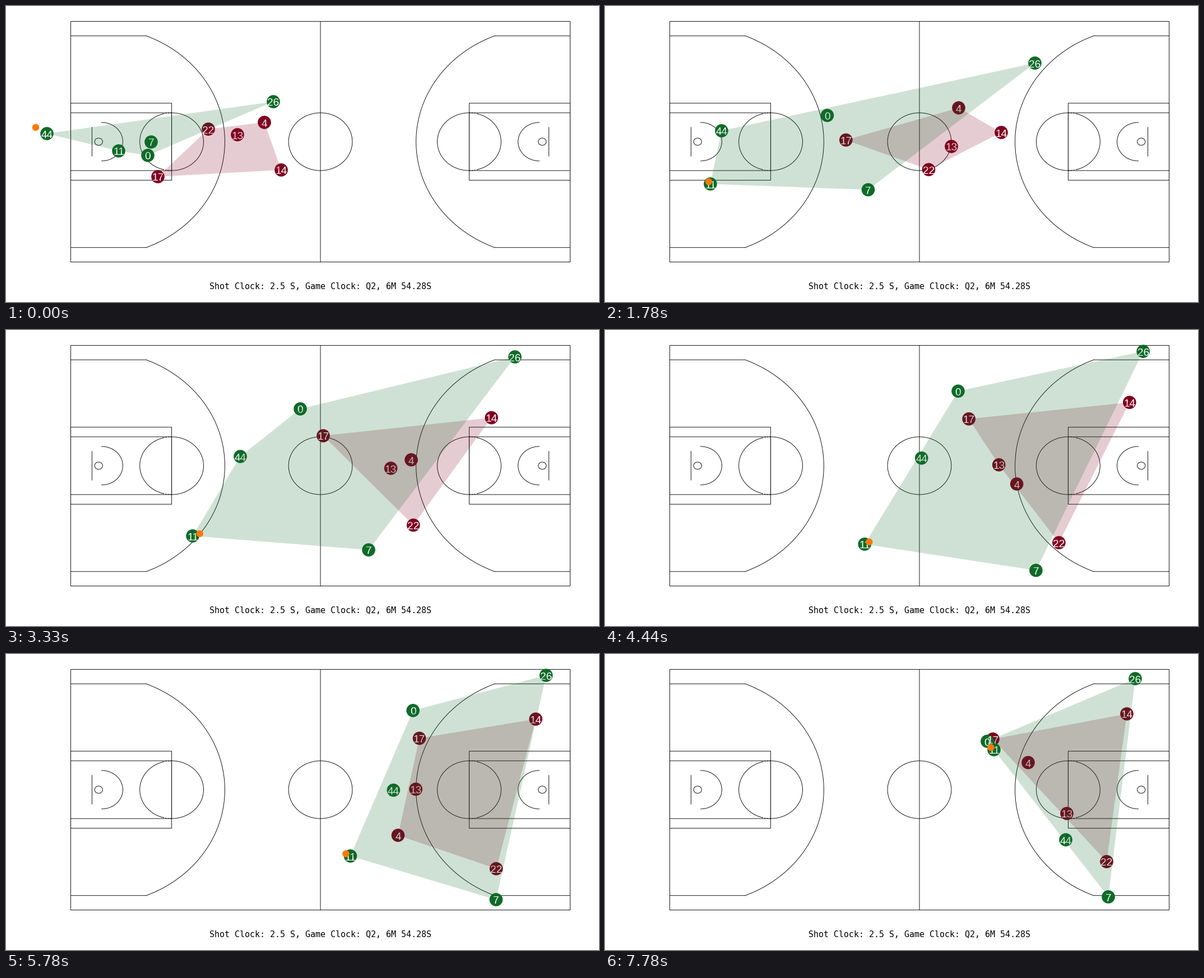
These frames come from a looping animation (1058 by 529 pixels, 8 s). A matplotlib script:

```python
import numpy as np
import matplotlib.pyplot as plt
from matplotlib.animation import FuncAnimation
from matplotlib.patches import Circle, Ellipse, Polygon, Rectangle

W, H, DPI = 1058, 529, 64
PT = 72 / DPI  # points per pixel

# The picture holds each of 36 poses; short ticks keep their starts on time.
POSES, LOOP_MS, TICK_MS, LEAD_MS = 36, 8000, 40, 32

GREEN, RED, ORANGE = "#0f6b28", "#800020", "#ff780a"
LEFT, TOP, RIGHT, BOTTOM = 115.5, 27.5, 1006.5, 457.5
FT_X, FT_Y = (RIGHT - LEFT) / 94, (BOTTOM - TOP) / 50

# Attackers: pose -> place on the stage, in pixels.
RUNS = {
    "26": {0: (477, 171), 8: (767, 102), 15: (908, 48), 22: (967, 37), 35: (946, 44)},
    "44": {0: (73, 228), 8: (208, 223), 15: (418, 226), 23: (638, 232),
           30: (751, 272), 35: (822, 332)},
    "11": {0: (201, 259), 8: (188, 318), 15: (333, 368), 23: (539, 386),
           30: (682, 290), 35: (694, 171)},
    "7": {0: (259, 243), 15: (647, 393), 23: (827, 439), 30: (909, 439), 35: (898, 434)},
    "0": {0: (253, 267), 15: (525, 141), 23: (683, 101), 30: (758, 101), 35: (682, 156)},
}
# Defenders: the attacker each one marks, and pose -> gap to that attacker.
MARKS = {
    "22": ("7", {0: (102, -23), 8: (108, -36), 30: (-10, -59), 35: (-3, -63)}),
    "13": ("44", {0: (340, 2), 8: (410, 28), 20: (138, 12), 30: (7, -15), 35: (2, -47)}),
    "4": ("11", {0: (260, -51), 8: (443, -136), 15: (390, -136), 30: (31, 0), 35: (61, 23)}),
    "14": ("26", {0: (14, 122), 8: (-60, 124), 22: (-21, 86), 35: (-15, 63)}),
    "17": ("0", {0: (18, 38), 15: (41, 48), 23: (9, 50), 30: (15, 48), 35: (10, -4)}),
}


def glide(keys):
    """Smooth path through the keys without overshoot, one point per pose."""
    t = np.array(list(keys), float)
    p = np.array(list(keys.values()), float)
    pace = np.diff(p, axis=0) / np.diff(t)[:, None]
    a, b = pace[:-1], pace[1:]
    same = a * b > 0
    inner = np.where(same, 2 * a * b / np.where(same, a + b, 1), 0)
    slope = np.vstack([pace[:1], inner, pace[-1:]])

    now = np.arange(POSES)
    i = np.clip(np.searchsorted(t, now, side="right") - 1, 0, len(t) - 2)
    span = (t[i + 1] - t[i])[:, None]
    u = (now - t[i])[:, None] / span
    return ((1 + 2 * u) * (1 - u) ** 2 * p[i] + u * (1 - u) ** 2 * span * slope[i]
            + u * u * (3 - 2 * u) * p[i + 1] + u * u * (u - 1) * span * slope[i + 1])


def ball_path(passer, carrier):
    """A quick inbound pass, then a dribble swaying around the carrier."""
    pose = np.arange(POSES)
    sway = 13 * np.cos(2 * np.pi * (pose - 16) / 28)
    carried = carrier + np.column_stack([sway, np.full(POSES, -4)])
    start = passer[0] + (-20, -11)
    u = np.clip(pose / 4, 0, 1)[:, None]
    return (1 - u) * start + u * carried


def convex_hull(points):
    pts = sorted(map(tuple, points))

    def chain(seq):
        out = []
        for x, y in seq:
            while len(out) > 1:
                (ax_, ay), (bx, by) = out[-2:]
                if (bx - ax_) * (y - ay) - (by - ay) * (x - ax_) > 0:
                    break
                out.pop()
            out.append((x, y))
        return out[:-1]

    return chain(pts) + chain(reversed(pts))


fig = plt.figure(figsize=(W / DPI, H / DPI), dpi=DPI, facecolor="white")
ax = fig.add_axes([0, 0, 1, 1])
ax.set(xlim=(0, W), ylim=(H, 0))
ax.axis("off")

INK = dict(lw=0.9 * PT, zorder=1, snap=False)


def line(xs, ys, style="-"):
    ax.plot(xs, ys, color="black", ls=style, **INK)


def rect(x, y, w, h):
    ax.add_patch(Rectangle((x, y), w, h, fill=False, ec="black", **INK))


def oval(x, y, r):
    ax.add_patch(Ellipse((x, y), 2 * r * FT_X, 2 * r * FT_Y, fill=False, ec="black", **INK))


def arc(x, y, r, start, end, side, style="-"):
    """Arc of r feet; angles are measured from the direction of `side`."""
    a = np.radians(np.linspace(start, end, 120))
    line(x + side * r * FT_X * np.cos(a), y + r * FT_Y * np.sin(a), style)


def draw_half(edge, side):
    mid = (TOP + BOTTOM) / 2

    def at(feet):
        return edge + side * feet * FT_X

    for half in (8, 6):
        rect(min(edge, at(19)), mid - half * FT_Y, 19 * FT_X, 2 * half * FT_Y)
    # Free-throw circle, broken only where its inner half begins.
    arc(at(19), mid, 6, -90, 90, side)
    arc(at(19), mid, 6, 106, 254, side)
    for a in (90, 254):
        arc(at(19), mid, 6, a, a + 16, side, (0, (3, 2)))
    corner = np.degrees(np.arcsin(22 / 23.75))
    arc(at(5.25), mid, 23.75, -corner, corner, side)
    reach = 5.25 + np.sqrt(23.75 ** 2 - 22 ** 2)
    for dy in (-22, 22):
        line([edge, at(reach)], [mid + dy * FT_Y] * 2)
    arc(at(5.8), mid, 4, -90, 90, side)
    oval(at(5.25), mid, 0.75)
    line([at(4)] * 2, [mid - 3 * FT_Y, mid + 3 * FT_Y])


rect(LEFT, TOP, RIGHT - LEFT, BOTTOM - TOP)
line([(LEFT + RIGHT) / 2] * 2, [TOP, BOTTOM])
oval((LEFT + RIGHT) / 2, (TOP + BOTTOM) / 2, 6)
draw_half(LEFT, 1)
draw_half(RIGHT, -1)
ax.text(561, 505.5, "Shot Clock: 2.5 S, Game Clock: Q2, 6M 54.28S", ha="center",
        va="baseline", family="DejaVu Sans Mono", size=15 * PT, color="black")


class Team:
    def __init__(self, paths, color, layer):
        self.paths = list(paths.values())
        self.dots = [ax.add_patch(Circle((0, 0), 11.8, fc=color, lw=0, zorder=2 + layer))
                     for _ in paths]
        self.labels = [ax.text(0, 0, name, color="white", ha="center", va="baseline",
                               family="Liberation Sans", size=19 * PT, zorder=4)
                       for name in paths]
        self.hull = ax.add_patch(Polygon([(0, 0)] * 3, fc=color, alpha=0.2, lw=0,
                                         zorder=5 + layer))

    def move(self, pose):
        spots = [path[pose] for path in self.paths]
        for (x, y), dot, label in zip(spots, self.dots, self.labels):
            dot.center = x, y
            label.set_position((x, y + 7.5))
        self.hull.set_xy(convex_hull(spots))


attack = {name: glide(keys) for name, keys in RUNS.items()}
defence = {name: attack[mark] + glide(gaps) for name, (mark, gaps) in MARKS.items()}
teams = [Team(defence, RED, 0), Team(attack, GREEN, 1)]
flight = ball_path(attack["44"], attack["11"])
ball = ax.add_patch(Circle((0, 0), 6.2, fc=ORANGE, lw=0, zorder=8))


def update(tick):
    pose = int((tick * TICK_MS + LEAD_MS) * POSES / LOOP_MS)
    for team in teams:
        team.move(pose)
    ball.center = tuple(flight[pose])
    return []


anim = FuncAnimation(fig, update, frames=LOOP_MS // TICK_MS, interval=TICK_MS,
                     init_func=lambda: update(0), repeat=True, repeat_delay=0)
plt.show()
```
